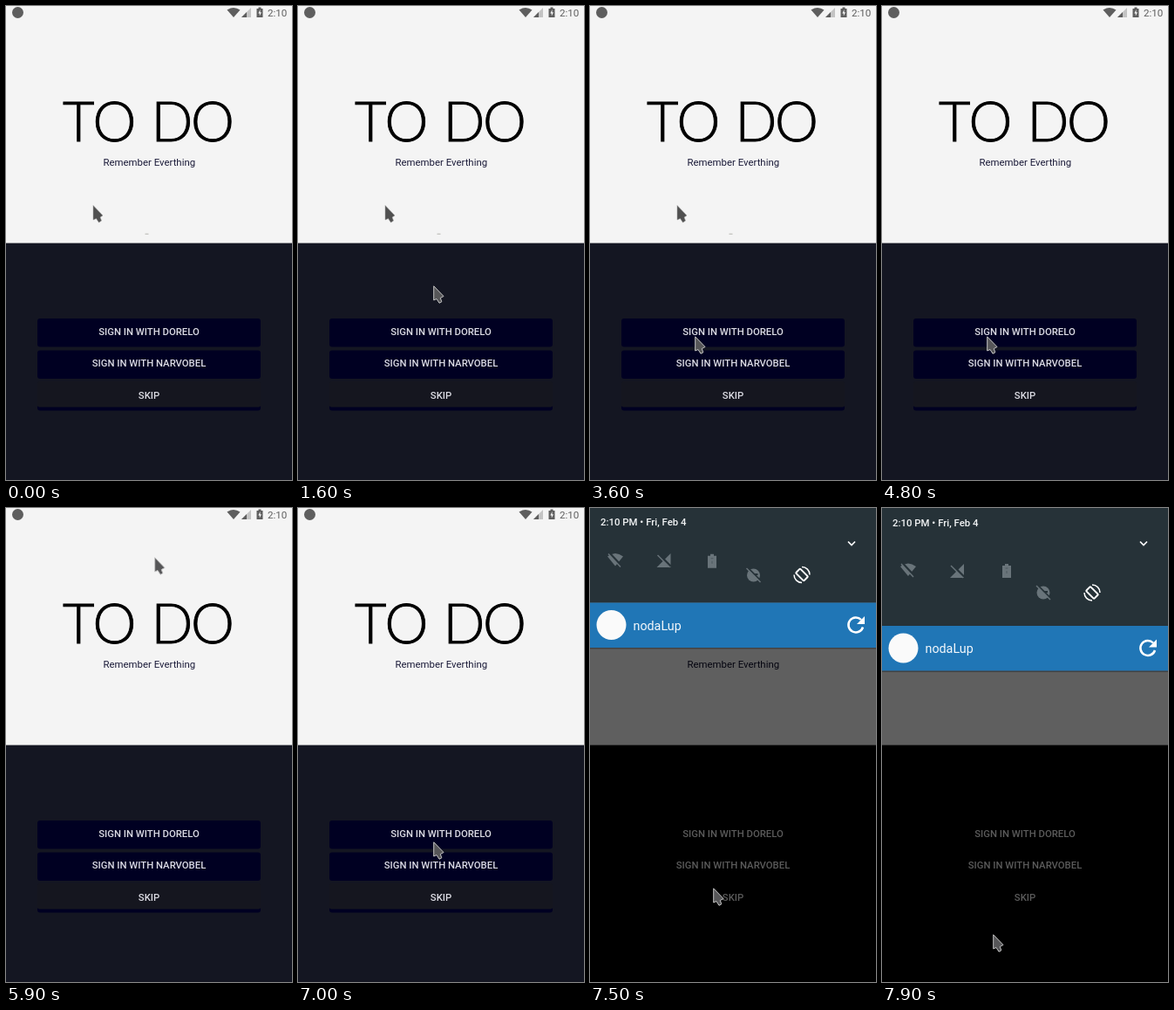
Write an HTML page that moves like this. It is 328 px wide and 543 px high and loops after 8 s.

```html
<!DOCTYPE html>
<html lang="en">
<head>
<meta charset="utf-8">
<title>To do</title>
<style>
  html, body { margin: 0; width: 100%; height: 100%; overflow: hidden; background: #141622; }
  svg { display: block; width: 328px; height: 543px; font-family: Roboto, sans-serif; }
  .paper { fill: #f4f4f4; }
  .floor { fill: #141622; }
  .button { fill: #000022; }
  .skip { fill: #15161f; }
  .title { font: 300 63px Lato, sans-serif; fill: #000; stroke: #000; stroke-width: .9px; }
  .tagline { font-size: 11.4px; fill: #1c1c3a; text-anchor: middle; }
  .label { font-size: 11.3px; font-weight: 500; fill: #dcdce4; text-anchor: middle; }
  .dim .paper { fill: #5f5f5f; }
  .dim .floor, .dim .button, .dim .skip { fill: #000; }
  .dim .label { fill: #5b5b5b; }
  .dim .tagline { fill: #050510; }
  .status { fill: #5e5e5e; }
  .quick { fill: #69747a; stroke: #69747a; }
  .line { fill: none; stroke: #fff; }
</style>
</head>
<body>
<svg viewBox="0 0 328 543">
  <g id="login">
    <rect class="paper" width="328" height="272"/>
    <rect class="floor" y="271.600" width="328" height="272"/>
    <text class="title" x="65 99.500 166.500 212" y="154.500">TODO</text>
    <text class="tagline" x="164.300" y="183.200">Remember Everthing</text>
    <rect class="button" x="36" y="358" width="256" height="32.5" rx="3"/>
    <rect class="button" x="36" y="394.5" width="256" height="32.5" rx="3"/>
    <rect class="button" x="36" y="431" width="256" height="32.5" rx="3"/>
    <rect class="skip" x="36" y="430" width="256" height="29.5" rx="2"/>
    <text class="label" x="164" y="377">SIGN IN WITH DORELO</text>
    <text class="label" x="164" y="413.300">SIGN IN WITH NARVOBEL</text>
    <text class="label" x="164" y="450">SKIP</text>
  </g>

  <g class="status">
    <circle cx="13.5" cy="7.5" r="6.5"/>
    <path d="M253.500 4.500Q261 -.5 268.500 4.500L261 13Z"/>
    <path d="M281 2V13H270Z" fill="#c4c4c4"/>
    <path d="M276 7V13H270Z"/>
    <path d="M287.500 3H289.500V1.500H292.500V3H294.500V13H287.500Z"/>
    <path d="M291.500 4L289.300 8.500H290.800V11.500L293 7.200H291.500Z" fill="#f4f4f4"/>
    <text x="300" y="12" font-size="11.6">2:10</text>
  </g>

  <g id="ghost">
    <path d="M100 228.500V245L103.500 243.500L106.500 248L109.500 246L108 242L111 240Z"
          fill="#505050" stroke="#999" stroke-opacity=".5"/>
    <rect x="159.500" y="260.500" width="4" height="1.500" fill="#c9c9c6"/>
  </g>

  <g id="shade">
    <rect id="panel" width="328" fill="#263238"/>
    <text id="clock" x="12" font-size="11.4" font-weight="500" fill="#f2f4f5">2:10 PM • Fri, Feb 4</text>
    <path class="line" d="M296 38.500L300 42.500L304 38.500" stroke-width="1.700"/>
    <g class="quick" data-from="28,48" data-to="30,71">
      <path d="M-9 -4Q0 -11 9 -4L0 7Z" stroke="none"/>
      <path d="M-8 -9L7 7" stroke="#263238" stroke-width="3"/>
      <path d="M-8 -7L6 8" stroke-width="1.400"/>
    </g>
    <g class="quick" data-from="83,48" data-to="86,72">
      <path d="M8 -8V8H-8Z" stroke="none"/>
      <path d="M-6 -7L8 7" stroke="#263238" stroke-width="3"/>
      <path d="M-7 -6L7 8" stroke-width="1.400"/>
    </g>
    <g class="quick" data-from="137,49.500" data-to="143,72">
      <path d="M-5 -6H-2V-8H2V-6H5V8H-5Z" stroke="none"/>
      <path d="M-1.500 -3H1.500M0 0V3" stroke="#4d585e" fill="none"/>
    </g>
    <g class="quick" data-from="190,57" data-to="185,97">
      <circle r="7.500" stroke="none"/>
      <path d="M-1 -1H5" stroke="#263238" stroke-width="2"/>
      <path d="M-7 -9L9 7" stroke="#263238" stroke-width="2"/>
      <path d="M-8 -8L8 8" stroke-width="1.400"/>
    </g>
    <g class="line" stroke-width="1.500" data-from="245,56" data-to="241,97">
      <rect x="-3.500" y="-6.500" width="7" height="13" rx="1" transform="rotate(-45)" stroke-width="2"/>
      <path d="M0 -9A9 9 0 0 1 9 0M0 9A9 9 0 0 1 -9 0"/>
    </g>
    <g id="bar">
      <rect width="328" height="51.500" fill="#2076b6"/>
      <rect y="51.500" width="328" height="1.500" fill="#000" opacity=".3"/>
      <circle cx="24.500" cy="25.500" r="17" fill="#fafafa"/>
      <text x="49.500" y="31" font-size="14.300" fill="#f4f8fb">nodaLup</text>
      <path class="line" d="M311 19.500A8.500 8.500 0 1 0 313 28" stroke-width="2.500"/>
      <path d="M315 15.500V24.500H306Z" fill="#fff"/>
    </g>
  </g>

  <path id="cursor" d="M.7 .8V17L4 15.500L7 20.300L9.800 18.800L8.300 14.500L12 12.500Z"
        fill="#565658" stroke="#c4c4c4" stroke-linejoin="round"/>
</svg>
<script>
const LOOP = 8000, STEP = 100;
const SHADE_START = 7100, SHADE_END = 7900, GHOST_END = 4800;

// Pointer runs: start time, then one x,y pair per step; it rests between runs.
const runs = [
  [1100, 26, 310],
  [1400, 70, 350, 120, 342, 155, 320, 110, 308, 55, 300, 15, 299],
  [2400, 8, 305, 2, 313, 40, 312, 100, 303, 136, 296],
  [3100, 150, 294, 175, 300, 191, 308],
  [3500, 76, 350, 120, 378],
  [4900, 140, 368, 159, 357],
  [5200, 136, 255, 113, 150, 160, 50, 195, 0],
  [5700, 191, 3, 180, 22, 170, 56, 162, 96, 157, 130],
  [6400, 158, 165, 154, 225, 156, 283],
  [6800, 155, 330, 155, 362, 155, 382]
];

const $ = id => document.getElementById(id);
const mix = (a, b, p) => a + (b - a) * p;
const place = (el, x, y) => el.setAttribute("transform", `translate(${x} ${y})`);
const pair = s => s.split(",").map(Number);
const icons = [...document.querySelectorAll("[data-from]")].map(el =>
  ({ el, from: pair(el.dataset.from), to: pair(el.dataset.to) }));

function pointerAt(t) {
  const run = runs.filter(r => r[0] <= t).pop();
  if (!run) return null;
  const last = (run.length - 3) / 2;
  const i = 1 + 2 * Math.min(last, Math.floor((t - run[0]) / STEP));
  return [run[i], run[i + 1]];
}

function drawShade(p) {
  const edge = mix(82, 135, p);
  $("panel").setAttribute("height", edge);
  $("clock").setAttribute("y", mix(18, 21, p));
  place($("bar"), 0, edge);
  for (const { el, from, to } of icons) {
    place(el, mix(from[0], to[0], p), mix(from[1], to[1], p));
  }
}

function draw(now) {
  const t = Math.floor((now % LOOP) / STEP) * STEP;
  const open = t >= SHADE_START;
  const p = open ? Math.min(1, (t - SHADE_START) / (SHADE_END - SHADE_START)) : 0;
  $("login").classList.toggle("dim", open);
  $("shade").style.display = open ? "" : "none";
  $("ghost").style.display = t < GHOST_END ? "" : "none";
  if (open) drawShade(p);

  const tip = pointerAt(t);
  $("cursor").style.display = tip ? "" : "none";
  if (tip) place($("cursor"), mix(tip[0], 127, p), mix(tip[1], 488, p));
}

const start = performance.now();
function tick() {
  draw(performance.now() - start);
  requestAnimationFrame(tick);
}
tick();
</script>
</body>
</html>
```
